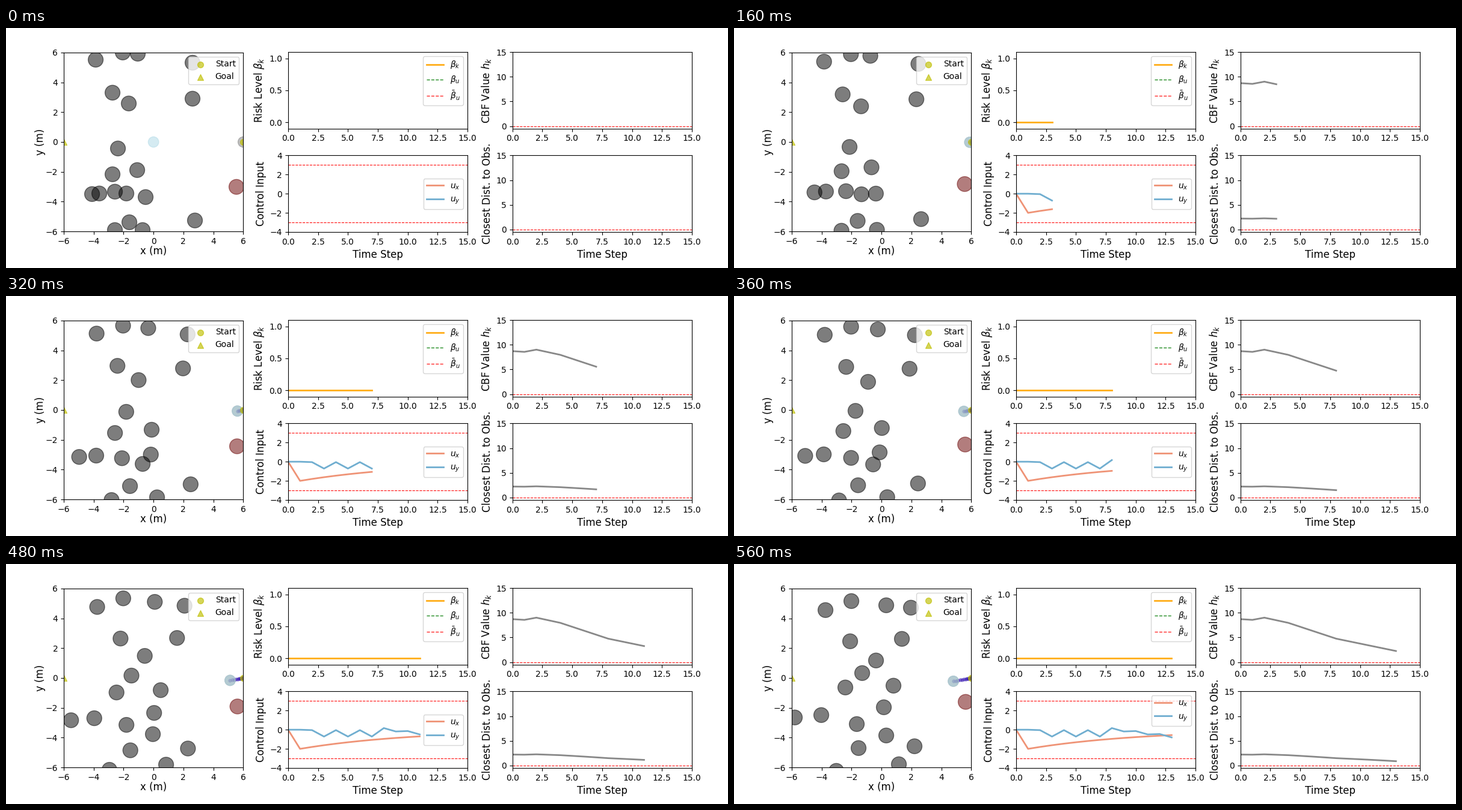
A matplotlib script for the animation above (1 s loop, 1200 by 400 pixels).

```python
import numpy as np
import matplotlib.pyplot as plt
from matplotlib.animation import FuncAnimation
from matplotlib.lines import Line2D
from matplotlib.patches import Circle

FRAMES, LAST = 25, 14
STEPS = np.arange(LAST)
ROBOT_R, OBS_R = 0.35, 0.5

# Start (x, y) and travel (dx, dy) of each obstacle, in stage pixels
OBSTACLES = np.array([
    (149, 53, 3, 24), (194, 41, 1, 21), (219, 43, 34, 26), (310, 58, -16, 15),
    (177, 108, 16, 21), (204, 126, 32, 35), (310, 118, -31, 7),
    (186, 201, 27, -19), (177, 244, 8, -38), (218, 237, 47, -34),
    (143, 277, -42, -21), (155, 276, -10, -24), (181, 273, 23, -6),
    (200, 276, 53, 10), (232, 282, 17, -43), (205, 324, 2, -17),
    (181, 337, -11, 8), (227, 337, 47, -3), (314, 321, -14, -17),
    (383, 265, 2, -35),
])
PX_PER_M = 24.86
FLIP = np.array([1, -1])
START = (OBSTACLES[:, :2] - (245.1, 190.2)) / PX_PER_M * FLIP
TRAVEL = OBSTACLES[:, 2:] / PX_PER_M * FLIP
EASE = np.array([1.2, 1.6])


def obstacles_at(n):
    """Each one speeds up gently, more in y than in x."""
    return START + TRAVEL * (n / LAST) ** EASE


def robot_at(n):
    n = np.asarray(n, float)
    return np.stack([6 - 0.0061 * n ** 2, -0.0011 * n ** 2], axis=-1)


def steer(k):
    """Rest, then a zigzag, then a weaker zigzag that drifts down."""
    sign = (-1.0) ** k
    late = 0.07 - 0.155 * (k - 8) + 0.1 * sign
    return np.select([k < 2, k < 8], [0, -0.38 + 0.335 * sign], late)


U_X = np.where(STEPS > 0, -2 * 0.9 ** (STEPS - 1.0), 0)
U_Y = steer(STEPS)
CBF = np.interp(STEPS, [0, 1, 2, 4, 8, 13], [8.7, 8.55, 9, 7.95, 4.75, 2.25])
REACH = ROBOT_R + OBS_R
DIST = np.sqrt(CBF + REACH ** 2) - REACH


def time_axes(row, col, ylim, ylabel, limits=()):
    ax = fig.add_subplot(grid[row, col])
    ax.set(xlim=(0, 15), ylim=ylim)
    ax.set_ylabel(ylabel, fontsize=12)
    if row == 1:
        ax.set_xlabel("Time Step", fontsize=12)
    for y in limits:
        ax.axhline(y, color="r", ls="--", lw=0.8)
    return ax


def curve(ax, values, color, label=None):
    line, = ax.plot([], [], color=color, lw=2, label=label)
    return line, values


fig = plt.figure(figsize=(12, 4), dpi=100)
grid = fig.add_gridspec(2, 3, left=0.08, right=0.95, bottom=0.15, top=0.9,
                        wspace=0.25, hspace=0.35)

# Map of the scene
scene = fig.add_subplot(grid[:, 0])
scene.set(xlim=(-6, 6), ylim=(-6, 6), aspect="equal",
          xticks=range(-6, 7, 2), yticks=range(-6, 7, 2))
scene.set_xlabel("x (m)", fontsize=12, labelpad=0)
scene.set_ylabel("y (m)", fontsize=12, labelpad=0)
for x, marker, text in ((6, "o", "Start"), (-6, "^", "Goal")):
    scene.scatter(x, 0, s=50, c="y", marker=marker, alpha=0.65, zorder=1.6,
                  label=text)
scene.legend(loc="upper right")

colors = ["k"] * (len(START) - 1) + ["#690000"]
obstacles = [scene.add_patch(Circle((0, 0), OBS_R, color=c, alpha=0.51))
             for c in colors]
trail = scene.scatter([], [], s=20, color="#3010b0", alpha=0.55, lw=0, zorder=1.5)
body = scene.add_patch(Circle((6, 0), ROBOT_R, color="gray", alpha=0.5, zorder=1.55))
halo = scene.add_patch(Circle((0, 0), ROBOT_R, color="lightblue", alpha=0.5,
                              zorder=1.56))

# Time series
risk = time_axes(0, 1, (-0.1, 1.1), r"Risk Level $\beta_k$")
control = time_axes(1, 1, (-4, 4), "Control Input", (-3, 3))
barrier = time_axes(0, 2, (-0.5, 15), "CBF Value $h_k$", (0,))
gap = time_axes(1, 2, (-0.5, 15), "Closest Dist. to Obs.", (0,))
for ax in (barrier, gap):
    ax.set_yticks(range(0, 16, 5))

curves = [
    curve(risk, np.zeros(LAST), "#ffae1a", r"$\beta_k$"),
    curve(control, U_X, "#ef9376", "$u_x$"),
    curve(control, U_Y, "#70aed0", "$u_y$"),
    curve(barrier, CBF, "#888888"),
    curve(gap, DIST, "#888888"),
]
bounds = [Line2D([], [], color=c, ls="--", lw=1, label=text)
          for c, text in (("forestgreen", r"$\beta_u$"),
                          ("#ff2a2a", r"$\bar{\beta}_u$"))]
risk.legend(handles=[curves[0][0], *bounds], loc="upper right")
control_legend = control.legend(loc="center right")


def update(frame):
    n = min(frame, LAST)
    for patch, pos in zip(obstacles, obstacles_at(n)):
        patch.center = pos
    body.center = robot_at(n)
    halo.center = robot_at(n) if n else (0, 0)
    trail.set_offsets(robot_at(np.arange(n + 1)) if n else np.empty((0, 2)))
    for line, values in curves:
        line.set_data(STEPS[:n], values[:n])
    # The legend gives way once the curves reach it
    control_legend.set_loc("upper right" if n > 12 else "center right")


anim = FuncAnimation(fig, update, frames=FRAMES, interval=40,
                     init_func=lambda: update(0), repeat=True, repeat_delay=0)
plt.show()
```
